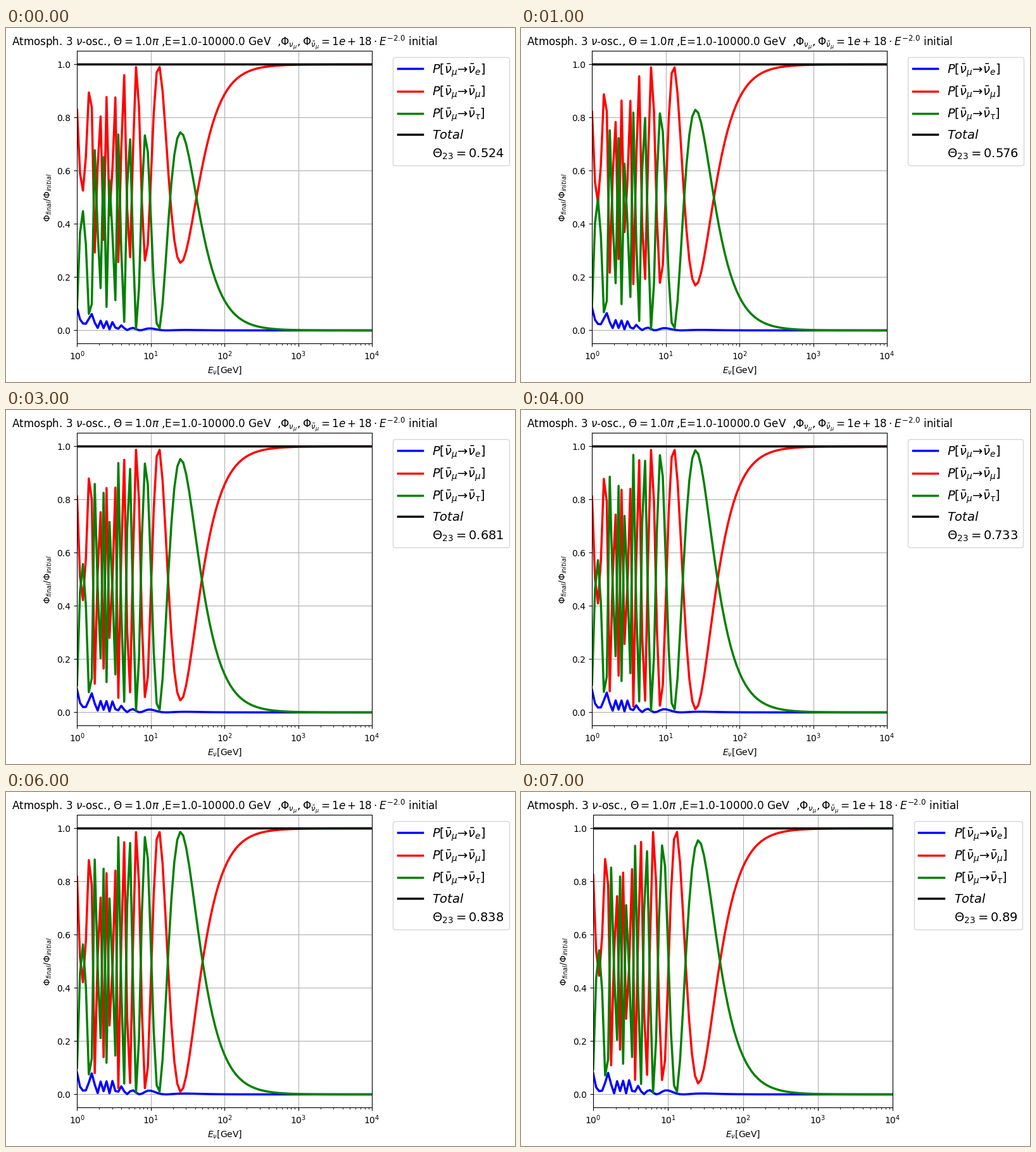
Animation of 804x559 px, one loop 8000 ms. Source, as a matplotlib script:

```python
import numpy as np
import matplotlib.pyplot as plt
from matplotlib.animation import FuncAnimation

W, H = 804, 559
FRAMES = 8
EARTH_R, AIR = 6371.0, 22.0          # km
TH12, TH13 = 0.583996, 0.148190
DM21, DM31 = 7.5e-5, 2.57e-3         # eV^2
KM_EV = 5.0677                       # eV^2 km / GeV to radians
V_MATTER = 3.868e-4                  # radians per km and g/cm^3

energy = np.logspace(0, 4, 101)


def electron_density(r):
    """Smooth Earth model: inner core, outer core, lower and upper mantle."""
    x = r / EARTH_R
    if r < 3480:
        return 0.4656 * ((13.09 if r < 1221 else 12.49) - 8.7 * x ** 2)
    return 0.4957 * (7.42 - 3.4 * x if r < 5701 else 10.07 - 6.8 * x)


def rotation(i, j, angle):
    m = np.eye(3)
    m[i, i] = m[j, j] = np.cos(angle)
    m[i, j], m[j, i] = np.sin(angle), -np.sin(angle)
    return m


def step(h, dx):
    """exp(-i h dx) for a stack of symmetric matrices."""
    val, vec = np.linalg.eigh(h)
    phase = np.exp(-1j * val * dx)
    return (vec * phase[:, None, :]) @ vec.transpose(0, 2, 1)


def earth_crossing(slices=300):
    """Antineutrino evolution through the whole Earth, theta_23 left out."""
    u = rotation(0, 2, TH13) @ rotation(0, 1, TH12)
    mass = u @ np.diag([0, DM21, DM31]) @ u.T
    vacuum = KM_EV * mass / (2 * energy[:, None, None])
    dx = EARTH_R / slices
    half = np.eye(3, dtype=complex)
    for k in range(slices):
        h = vacuum.copy()
        h[:, 0, 0] -= V_MATTER * electron_density(EARTH_R - (k + 0.5) * dx)
        half = step(h, dx) @ half
    return half.transpose(0, 2, 1) @ half @ step(vacuum, AIR)


crossing = earth_crossing()


def probabilities(th23):
    r = rotation(1, 2, th23)
    s = r @ crossing @ r.T
    return np.abs(s[:, :, 1].T) ** 2


TITLE = (r"Atmosph. 3 $\nu$-osc., $\Theta=1.0\pi$ ,E=1.0-10000.0 GeV  ,"
         r"$\Phi_{\nu_{\mu}},\Phi_{\bar{\nu}_{\mu}}=1e+18\cdot E^{-2.0}$ initial")
CURVES = [("e", "blue"), (r"\mu", "red"), (r"\tau", "green")]

fig = plt.figure(figsize=((W + 0.001) / 100, (H + 0.001) / 100), dpi=100,
                 facecolor="white")
ax = fig.add_axes([0.1, 0.1, 0.5, 0.8])


def draw(i):
    th23 = (10 + i) * np.pi / 60
    value = str(round(float(th23), 3))
    prob = probabilities(th23)

    # A missing digit narrows the page, which is then widened to the stage
    wide = W / (802.5 - 12.4 * (5 - len(value)))

    ax.clear()
    ax.set_position([112 * wide / W, 60.5 / H, 465 * wide / W, 462 / H])
    for p, (flavour, color) in zip(prob, CURVES):
        # The bare arrow character is set without space around it
        label = r"$P[\bar{\nu}_{\mu}→\bar{\nu}_{%s}]$" % flavour
        ax.plot(energy, p, color=color, lw=2.5, label=label)
    ax.plot(energy, prob.sum(axis=0), color="black", lw=2.5, label="$Total$")
    ax.plot([], [], " ", label=r"$\Theta_{23}=%s$" % value)

    ax.set_xscale("log")
    ax.set_xlim(1, 1e4)
    ax.set_ylim(-0.05, 1.05)
    ax.grid(True)
    ax.set_xlabel(r"$E_{\nu}$[GeV]")
    ax.set_ylabel(r"$\Phi_{final}/\Phi_{initial}$")
    ax.set_title(TITLE, fontsize=12 * wide)
    ax.legend(loc="upper left", bbox_to_anchor=(1.05, 1), fontsize=14,
              handlelength=2 * wide, handletextpad=0.8 * wide)
    return []


anim = FuncAnimation(fig, draw, frames=FRAMES, interval=1000,
                     init_func=lambda: draw(0), repeat=True, repeat_delay=0,
                     blit=False)
plt.show()
```
